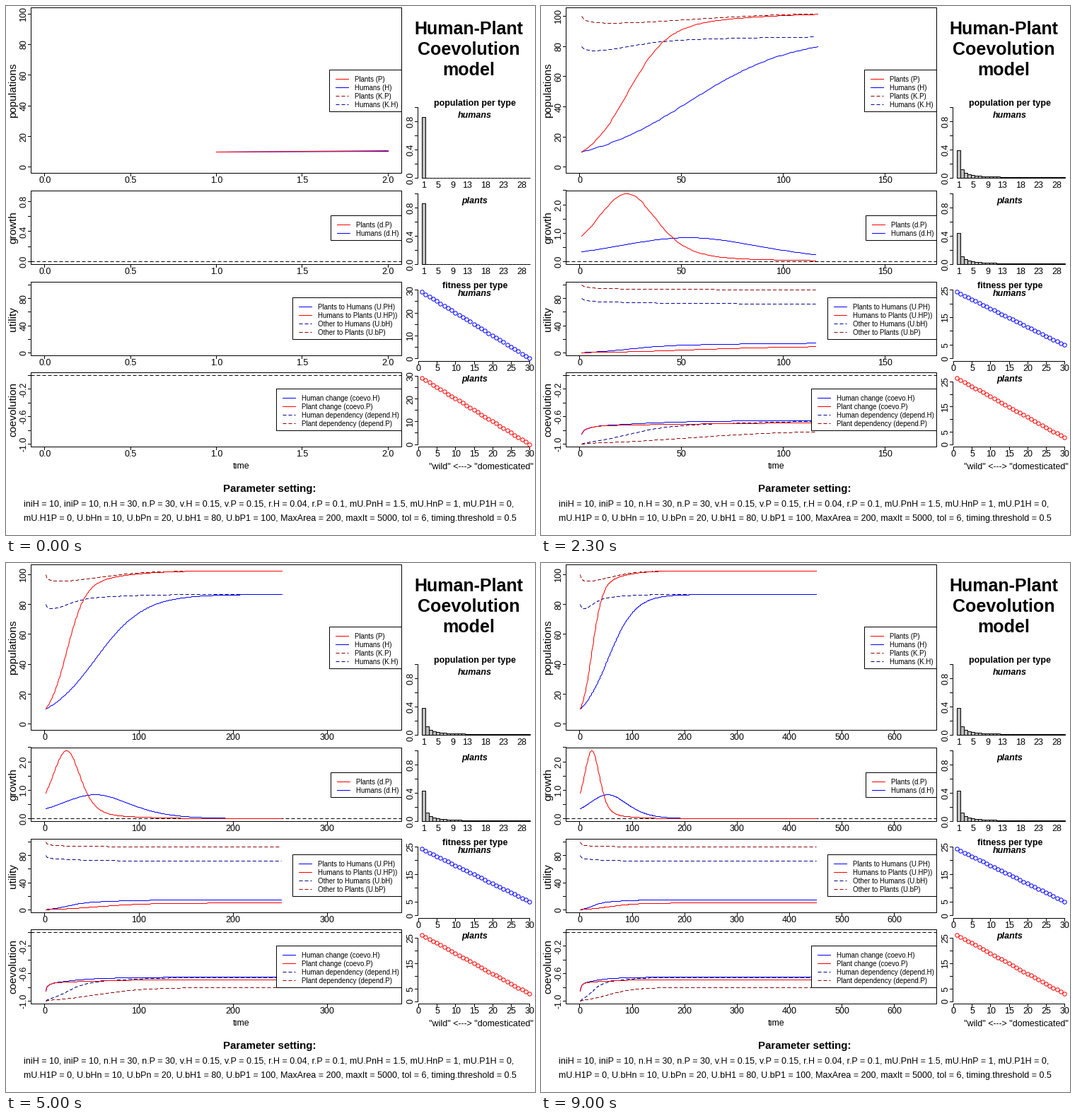
Animation, 748 px wide and 748 px high, one loop 9100 ms. Source, as a matplotlib script:

```python
import numpy as np
import matplotlib.pyplot as plt
from matplotlib.animation import FuncAnimation
from matplotlib.patches import Rectangle
from matplotlib.transforms import Bbox

SIZE, DPI = 748, 64
FRAMES, STEP = 91, 5
N, V = 30, 0.15
LEFT, RIGHT = 35, 559
FONT = 12.5
DASH = (0, (5, 3))
RED, BLUE, DARKRED, DARKBLUE = "#ff0000", "#0000ff", "#8b0000", "#00008b"

plt.rcParams["font.family"] = "Liberation Sans"


def simulate(steps, r_h=0.04, r_p=0.1):
    """Coupled growth of humans and plants with selection among N types."""
    share = np.linspace(0, 1, N)
    mix_h, mix_p = np.eye(N)[0], np.eye(N)[0]
    h, p = 10.0, 10.0
    names = "H P KH KP dH dP UPH UHP UbH UbP cH cP depH depP fitH fitP popH popP"
    log = {name: [] for name in names.split()}

    def fitness(own, other):
        return (N - 1) * ((1 - share) * own + share * other) / (own + other)

    for _ in range(steps):
        u_ph = p * mix_p @ (1.5 * share)
        u_hp = h * mix_h @ share
        u_bh = mix_h @ (80 - 70 * share)
        u_bp = mix_p @ (100 - 80 * share)
        k_h, k_p = u_ph + u_bh, min(u_hp + u_bp, 200)
        d_h, d_p = r_h * h * (1 - h / k_h), r_p * p * (1 - p / k_p)
        fit_h, fit_p = fitness(u_bh, u_ph), fitness(u_bp, u_hp)
        var_h = mix_h * (1 - V) + V / N
        var_p = mix_p * (1 - V) + V / N
        row = (h, p, k_h, k_p, d_h, d_p, u_ph, u_hp, u_bh, u_bp,
               2 * var_h @ share - 1, 2 * var_p @ share - 1,
               (u_ph - u_bh) / (u_ph + u_bh), (u_hp - u_bp) / (u_hp + u_bp),
               fit_h, fit_p, var_h, var_p)
        for name, value in zip(log, row):
            log[name].append(value)
        mix_h = var_h * fit_h / (var_h @ fit_h)
        mix_p = var_p * fit_p / (var_p @ fit_p)
        h, p = h + d_h, p + d_p
    return {name: np.array(values) for name, values in log.items()}


log = simulate(2 + STEP * FRAMES)

# Whole numbers are pixel centres, so rounded lines stay crisp
fig = plt.figure(figsize=(SIZE / DPI, SIZE / DPI), dpi=DPI, facecolor="white")
ax = fig.add_axes([0, 0, 1, 1])
ax.set_xlim(-0.5, SIZE - 0.5)
ax.set_ylim(SIZE - 0.5, -0.5)
ax.axis("off")


def pt(px):
    return px * 72 / DPI


def line(x, y, color="black", ls="-", z=2):
    return ax.plot(np.round(x), np.round(y), color=color, ls=ls, lw=pt(1),
                   solid_capstyle="projecting", dash_capstyle="butt",
                   snap=False, zorder=z)[0]


def text(x, y, s, size=FONT, ha="center", rot=0, z=6, **kw):
    return ax.text(x, y, s, fontsize=pt(size), ha=ha, va="baseline",
                   rotation=rot, rotation_mode="anchor", zorder=z, **kw)


def box(x0, y0, x1, y1, face="none", z=2):
    return ax.add_patch(Rectangle((x0, y0), x1 - x0, y1 - y0, fc=face,
                                  ec="black", lw=pt(1), snap=False, zorder=z))


def ticks(lo, hi):
    """Round tick values inside the range padded by 4 %."""
    pad = 0.04 * (hi - lo)
    lo, hi = lo - pad, hi + pad
    cell = (hi - lo) / 5
    base = 10 ** np.floor(np.log10(cell))
    unit = base
    if 2 * base - cell < 0.8 * (cell - unit):
        unit = 2 * base
        if 5 * base - cell < 1.7 * (cell - unit):
            unit = 5 * base
            if 10 * base - cell < 0.8 * (cell - unit):
                unit = 10 * base
    slack = 0.03
    first, last = np.ceil(lo / unit - slack), np.floor(hi / unit + slack)
    return np.arange(first, last + 1) * unit, 0 if unit > 0.99 else 1


def label_width(s):
    wide = {".": 0.278, "-": 0.333}
    return FONT * sum(wide.get(c, 0.556) for c in s)


def axis(lo, hi, to_px, edge, vertical, gap=9.6, spine=False):
    """Ticks and labels along one side; labels that would crowd are skipped."""
    values, digits = ticks(lo, hi)
    made, end = [], -1e9
    pos = [to_px(v) for v in values]
    sign = -1 if vertical else 1
    for v, c in zip(values, pos):
        if vertical:
            made.append(line([edge - 4, edge], [c, c]))
        else:
            made.append(line([c, c], [edge, edge + 4]))
        s = f"{v if abs(v) > 1e-9 else 0:.{digits}f}"
        half = label_width(s) / 2
        if sign * c - half - end >= gap:
            end = sign * c + half
            made.append(text(edge - 7, c, s, rot=90) if vertical
                        else text(c, edge + 13.5, s))
    if spine:
        ends = [pos[0], pos[-1]]
        made.append(line([edge, edge], ends) if vertical
                    else line(ends, [edge, edge]))
    return made


def scale(lo, hi, a, b):
    return lambda v: a + (v - lo) * (b - a) / (hi - lo)


class Panel:
    """A time series box with its legend."""

    def __init__(self, name, top, bottom, series, legend, corner, limits):
        self.bottom, self.series, self.limits = bottom, series, limits
        pad = (bottom - top) * 0.04 / 1.08
        self.low, self.high = bottom - pad, top + pad
        box(LEFT, top, RIGHT, bottom)
        text(14, (top + bottom) / 2, name, 15.2, rot=90)
        x, y = corner
        box(x, y, RIGHT, y + 12 * len(legend) + 11, "white", 4)
        for i, (label, color, ls) in enumerate(legend):
            row = y + 13 + 11.9 * i
            line([x + 9, x + 27], [row, row], color, ls, 5)
            text(x + 36, row + 3.7, label, 9.7, ha="left")

    def draw(self, t):
        x_max = 1.45 * t - 0.9
        pad = (RIGHT - LEFT) * 0.04 / 1.08
        to_x = scale(0, x_max, LEFT + pad, RIGHT - pad)
        lo, hi = self.limits(t)
        to_y = scale(lo, hi, self.low, self.high)
        made = axis(0, x_max, to_x, self.bottom, False)
        made += axis(lo, hi, to_y, LEFT, True)
        for key, color, ls in self.series:
            n = t if key in "HP" else t - 1
            if n > 1:
                x = to_x(np.arange(1, n + 1))
                made.append(line(x, to_y(log[key][:n]), color, ls, 3))
        return made


def peak(*keys):
    return lambda t: (0, max(log[k][:t - 1].max() for k in keys))


def population_limits(t):
    return 0, max(log["KP"][:t - 1].max(), log["P"][:t].max())


panels = [
    Panel("populations", 2, 236,
          [("KP", DARKRED, DASH), ("KH", DARKBLUE, DASH),
           ("H", BLUE, "-"), ("P", RED, "-")],
          [("Plants (P)", RED, "-"), ("Humans (H)", BLUE, "-"),
           ("Plants (K.P)", DARKRED, DASH), ("Humans (K.H)", DARKBLUE, DASH)],
          (457, 90), population_limits),
    Panel("growth", 261, 365, [("dH", BLUE, "-"), ("dP", RED, "-")],
          [("Plants (d.P)", RED, "-"), ("Humans (d.H)", BLUE, "-")],
          (459, 296), peak("dH", "dP")),
    Panel("utility", 390, 494,
          [("UbH", DARKBLUE, DASH), ("UbP", DARKRED, DASH),
           ("UPH", BLUE, "-"), ("UHP", RED, "-")],
          [("Plants to Humans (U.PH)", BLUE, "-"),
           ("Humans to Plants (U.HP))", RED, "-"),
           ("Other to Humans (U.bH)", DARKBLUE, DASH),
           ("Other to Plants (U.bP)", DARKRED, DASH)],
          (405, 412), peak("UbP")),
    Panel("coevolution", 518, 623,
          [("depH", DARKBLUE, DASH), ("depP", DARKRED, DASH),
           ("cH", BLUE, "-"), ("cP", RED, "-")],
          [("Human change (coevo.H)", BLUE, "-"),
           ("Plant change (coevo.P)", RED, "-"),
           ("Human dependency (depend.H)", DARKBLUE, DASH),
           ("Plant dependency (depend.P)", DARKRED, DASH)],
          (382, 541), lambda t: (-1, 0)),
]
for y in (361, 522):
    line([LEFT, RIGHT], [y, y], ls=DASH)

# Headings and notes
for i, word in enumerate(("Human-Plant", "Coevolution", "model")):
    text(654, 39 + 29.5 * i, word, 25, weight="bold")
text(662.5, 141, "population per type", weight="bold")
text(662.5, 399, "fitness per type", weight="bold")
for y, word in ((158, "humans"), (278.5, "plants"), (410, "humans"), (531, "plants")):
    text(662.5, y, word, weight="bold", style="italic")
text(671, 654.5, '"wild" <---> "domesticated"')
text(372.5, 687, "Parameter setting:", 15, weight="bold")
text(371, 707.5, "iniH = 10, iniP = 10, n.H = 30, n.P = 30, v.H = 0.15, v.P = 0.15, "
     "r.H = 0.04, r.P = 0.1, mU.PnH = 1.5, mU.HnP = 1, mU.P1H = 0,")
text(373, 728, "mU.H1P = 0, U.bHn = 10, U.bPn = 20, U.bH1 = 80, U.bP1 = 100, "
     "MaxArea = 200, maxIt = 5000, tol = 6, timing.threshold = 0.5")
time_label = text(332.5, 653.5, "time", clip_on=True)
time_label.set_clip_box(Bbox([[0, 0], [SIZE, SIZE - 646]]))

# Axes that never change
BAR_X, BAR_W = 587.5, 5.125
bars = []
for base, key in ((243, "popH"), (365, "popP")):
    axis(0, 1, scale(0, 1, base, base - 100), 582, True, spine=True)
    edges = np.round(BAR_X + BAR_W * np.arange(N + 1))
    for i in (1, 5, 9, 13, 18, 23, 28):
        text(BAR_X + BAR_W * (i - 0.5), base + 13.5, str(i))
    row = [box(a, base, b, base, "#bebebe") for a, b in zip(edges, edges[1:])]
    bars.append((row, key))

type_x = scale(0, 30, 583, 740)
dots = []
for zero, key, color in ((498, "fitH", BLUE), (619.5, "fitP", RED)):
    axis(1, 30, type_x, round(zero + 3.6), False, spine=True)
    marks = ax.plot(np.round(type_x(np.arange(1, N + 1))), np.zeros(N), "o",
                    ms=pt(5.4), mfc="none", mec=color, mew=pt(1), zorder=3)[0]
    dots.append((marks, key, zero))

moving = []


def update(frame):
    for artist in moving:
        artist.remove()
    moving.clear()
    t = 2 + STEP * frame
    for panel in panels:
        moving.extend(panel.draw(t))
    for row, key in bars:
        for bar, part in zip(row, log[key][t - 2]):
            bar.set_height(-np.round(100 * part))
    for marks, key, zero in dots:
        fit = log[key][t - 2]
        to_y = scale(0, fit.max(), zero, zero - 93.5)
        marks.set_ydata(np.round(to_y(fit)))
        moving.extend(axis(0, fit.max(), to_y, 582, True, spine=True))
    return []


anim = FuncAnimation(fig, update, frames=FRAMES, interval=100,
                     repeat=True, repeat_delay=0, blit=False)
plt.show()
```
